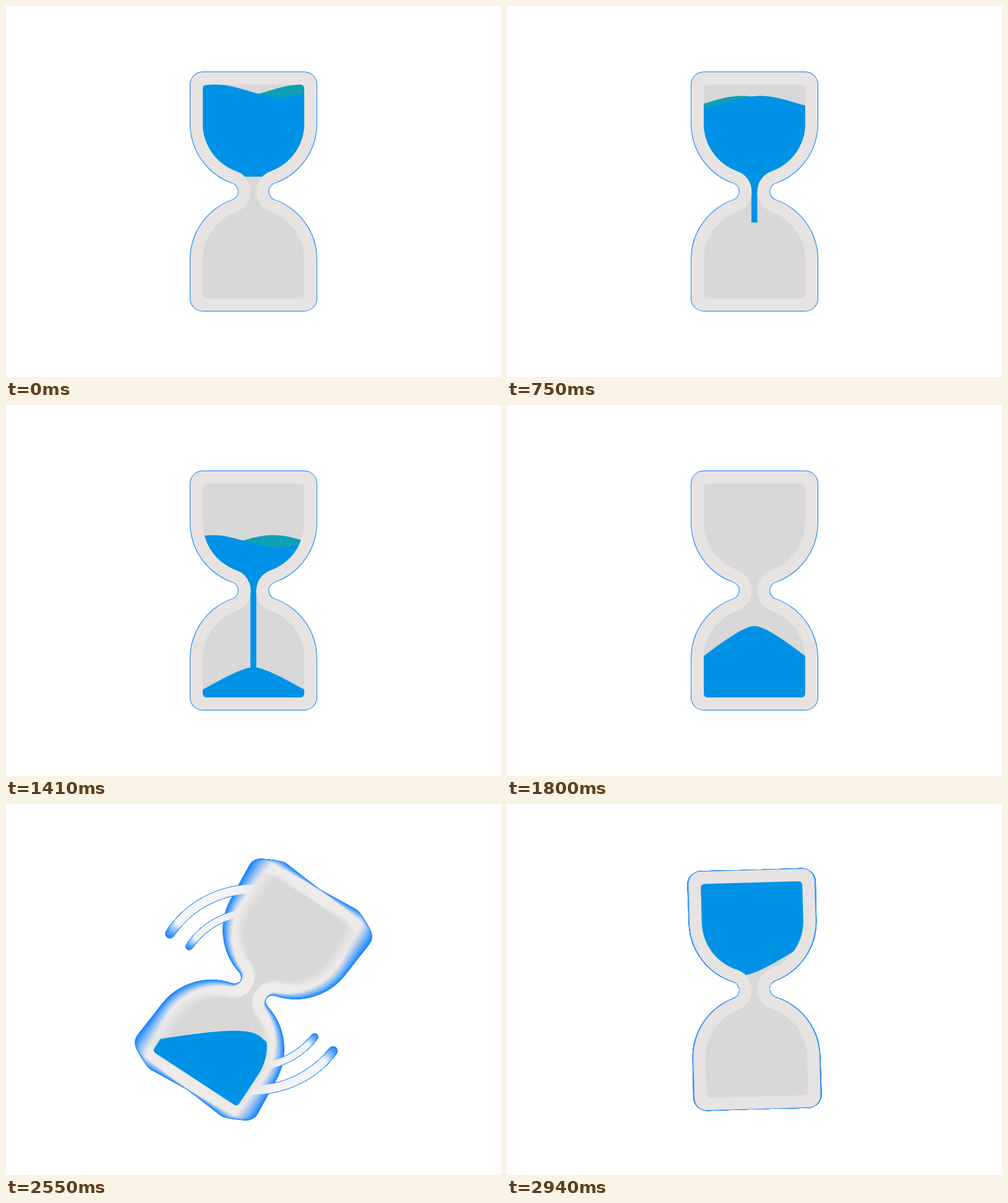
Recreate the animation shown at these times as an HTML page with a canvas. Size 800 by 600 pixels, loop 2970 ms.

```html
<!DOCTYPE html>
<html lang="en">
<head>
<meta charset="utf-8">
<title>Hourglass</title>
<style>
  html, body { margin: 0; width: 100%; height: 100%; overflow: hidden; background: #fff; }
  canvas { display: block; }
</style>
</head>
<body>
<canvas id="stage" width="800" height="600"></canvas>
<script>
const W = 800, H = 600, LOOP = 2970, STEP = 30, SHUTTER = 13.5, SAMPLES = 51;
const RAD = Math.PI / 180;
const BLUE = '#0092e6', TEAL = '#0fa0b6', EDGE = '#0f82ff', FRAME = '#e7e3e2';
const GLASS = '#d7d8d7', TRAIL = '#f4f4f4';
const ctx = document.getElementById('stage').getContext('2d');
const mask = document.createElement('canvas');
mask.width = W;
mask.height = H;
const soft = mask.getContext('2d');

const mix = (a, b, p) => a + (b - a) * p;

// Smooth step from 0 to 1 between two times
function ease(t, from, to) {
  const p = Math.min(1, Math.max(0, (t - from) / (to - from)));
  return (1 - Math.cos(Math.PI * p)) / 2;
}

// Wind up, swing past upside down, swing back and settle
const turn = t => -17.5 * ease(t, 2250, 2375) + 217.5 * ease(t, 2420, 2825)
  - 22.5 * ease(t, 2825, 2920) + 2.5 * ease(t, 2920, LOOP);

const trailLength = t => t > 2490 && t < 2775 ? 83 * Math.sin(Math.PI * (t - 2490) / 285) : 0;

// Two bowls joined by a rounded neck, centred on the origin
function glassPath(w, h, r) {
  const bowl = 110, neck = 39;
  const a = Math.atan2(bowl, neck), k = Math.hypot(bowl, neck) - w, PI = Math.PI;
  const p = new Path2D();
  p.moveTo(0, -h);
  p.arcTo(w, -h, w, -bowl, r);
  p.arc(0, -bowl, w, 0, a);
  p.arc(neck, 0, k, PI + a, PI - a, true);
  p.arc(0, bowl, w, -a, 0);
  p.arcTo(w, h, 0, h, r);
  p.arcTo(-w, h, -w, bowl, r);
  p.arc(0, bowl, w, PI, PI + a);
  p.arc(-neck, 0, k, a, -a, true);
  p.arc(0, -bowl, w, PI - a, PI);
  p.arcTo(-w, -h, 0, -h, r);
  p.closePath();
  return p;
}
const OUTER = glassPath(102, 193, 20);
const INNER = glassPath(82, 173, 6);

function pose(c, angle) {
  c.setTransform(1, 0, 0, 1, W / 2, H / 2);
  c.rotate(angle * RAD);
}

// Averages a shape over the angles swept while the shutter is open
function blur(angles, color, draw) {
  soft.setTransform(1, 0, 0, 1, 0, 0);
  soft.globalCompositeOperation = 'source-over';
  soft.globalAlpha = 1;
  soft.clearRect(0, 0, W, H);
  soft.globalCompositeOperation = 'lighter';
  soft.globalAlpha = 1 / angles.length;
  soft.fillStyle = soft.strokeStyle = '#fff';
  for (const a of angles) {
    pose(soft, a);
    draw(soft);
  }
  soft.setTransform(1, 0, 0, 1, 0, 0);
  soft.globalAlpha = 1;
  soft.globalCompositeOperation = 'source-in';
  soft.fillStyle = color;
  soft.fillRect(0, 0, W, H);
  ctx.setTransform(1, 0, 0, 1, 0, 0);
  ctx.drawImage(mask, 0, 0);
}

// Motion lines behind both ends, in the frame of the glass
function trails(c, length, grow) {
  c.lineCap = 'round';
  for (const side of [0, 1]) {
    const head = (60 + side * 180) * RAD;
    const tail = head - (length + side * 4) * RAD;
    for (const [r, width] of [[162.5, 14], [125, 10.5]]) {
      c.lineWidth = width + grow;
      c.beginPath();
      c.arc(0, 0, r, tail, head);
      c.stroke();
    }
  }
}

function wave(color, level, amp, crest, bottom) {
  ctx.fillStyle = color;
  ctx.beginPath();
  ctx.moveTo(316, bottom);
  for (let x = 316; x <= 484; x += 2) {
    const y = level - amp * Math.cos(2 * Math.PI * (x - crest) / 210);
    ctx.lineTo(x, Math.min(y, bottom));
  }
  ctx.lineTo(484, bottom);
  ctx.fill();
}

function drain(t) {
  const p = t / 1020;
  const level = 137 + 34 * p ** 2 + p ** 9;
  const front = Math.min(473, 276 + 162 * p ** 2.54);
  const bottom = Math.min(front, 300);
  const amp = Math.min(10, Math.max(2, (300 - level) / 8));
  if (level < 300) {
    wave(TEAL, level, amp, 478 - 0.076 * t - 7.5e-5 * t * t, bottom);
    wave(BLUE, level, amp, 338 + 0.039 * t + 7.6e-5 * t * t, bottom);
  }
  const top = Math.max(299.5, level);
  if (front > top) ctx.fillRect(395, top, 9.5, front - top);
}

// Heap that fills up, leans while the glass turns, then slides to the neck
function mound(t) {
  const fill = ease(t, 1090, 1800), slide = ease(t, 2700, LOOP);
  const lean = t > 2250 ? 108 * Math.sin(Math.PI * (t - 2250) / 850) ** 2 : 0;
  const side = mix(500, 406, fill) - 55 * slide;
  const left = side + lean / 2, right = side - lean / 2;
  const peak = mix(473, 357.5, fill) - 35 * slide;
  const px = 400 + 0.55 * lean;
  const near = x => mix(x, px, 0.51), far = x => mix(px, x, 0.18);
  ctx.beginPath();
  ctx.moveTo(310, 480);
  ctx.lineTo(310, left + 5);
  ctx.lineTo(318, left);
  ctx.bezierCurveTo(near(318), mix(left, peak, 0.65), far(318), peak, px, peak);
  ctx.bezierCurveTo(far(482), peak, near(482), mix(right, peak, 0.65), 482, right);
  ctx.lineTo(490, right + 5);
  ctx.lineTo(490, 480);
  ctx.fill();
}

function draw(t) {
  const from = turn(t - SHUTTER / 2), sweep = turn(t + SHUTTER / 2) - from;
  const count = Math.abs(sweep) > 0.1 ? SAMPLES : 1;
  const angles = Array.from({ length: count }, (_, i) => from + sweep * (i + 0.5) / count);
  const length = trailLength(t);

  ctx.setTransform(1, 0, 0, 1, 0, 0);
  ctx.fillStyle = '#fff';
  ctx.fillRect(0, 0, W, H);

  // Blue rim around everything the shapes sweep
  ctx.fillStyle = ctx.strokeStyle = EDGE;
  for (const a of angles) {
    pose(ctx, a);
    if (length) trails(ctx, length, 1);
    ctx.lineWidth = count > 1 ? 1 : 2;
    ctx.fill(OUTER);
    ctx.stroke(OUTER);
  }

  if (length) blur(angles, TRAIL, c => trails(c, length, 0));
  // The frame pales as it speeds up
  const pale = Math.min(1, Math.abs(sweep) / 10);
  blur(angles, FRAME, c => c.fill(OUTER));
  blur(angles, `rgba(255,255,255,${0.3 * pale})`, c => c.fill(OUTER));
  blur(angles, GLASS, c => c.fill(INNER));

  ctx.save();
  pose(ctx, turn(t));
  ctx.clip(INNER);
  ctx.translate(-W / 2, -H / 2);
  ctx.fillStyle = BLUE;
  if (t < 1800) drain(t);
  if (t > 1090) mound(t);
  ctx.restore();
}

const start = performance.now();
let last = -1;
function tick() {
  const t = Math.floor((performance.now() - start) % LOOP / STEP) * STEP;
  if (t !== last) draw(last = t);
  requestAnimationFrame(tick);
}
tick();
</script>
</body>
</html>
```
